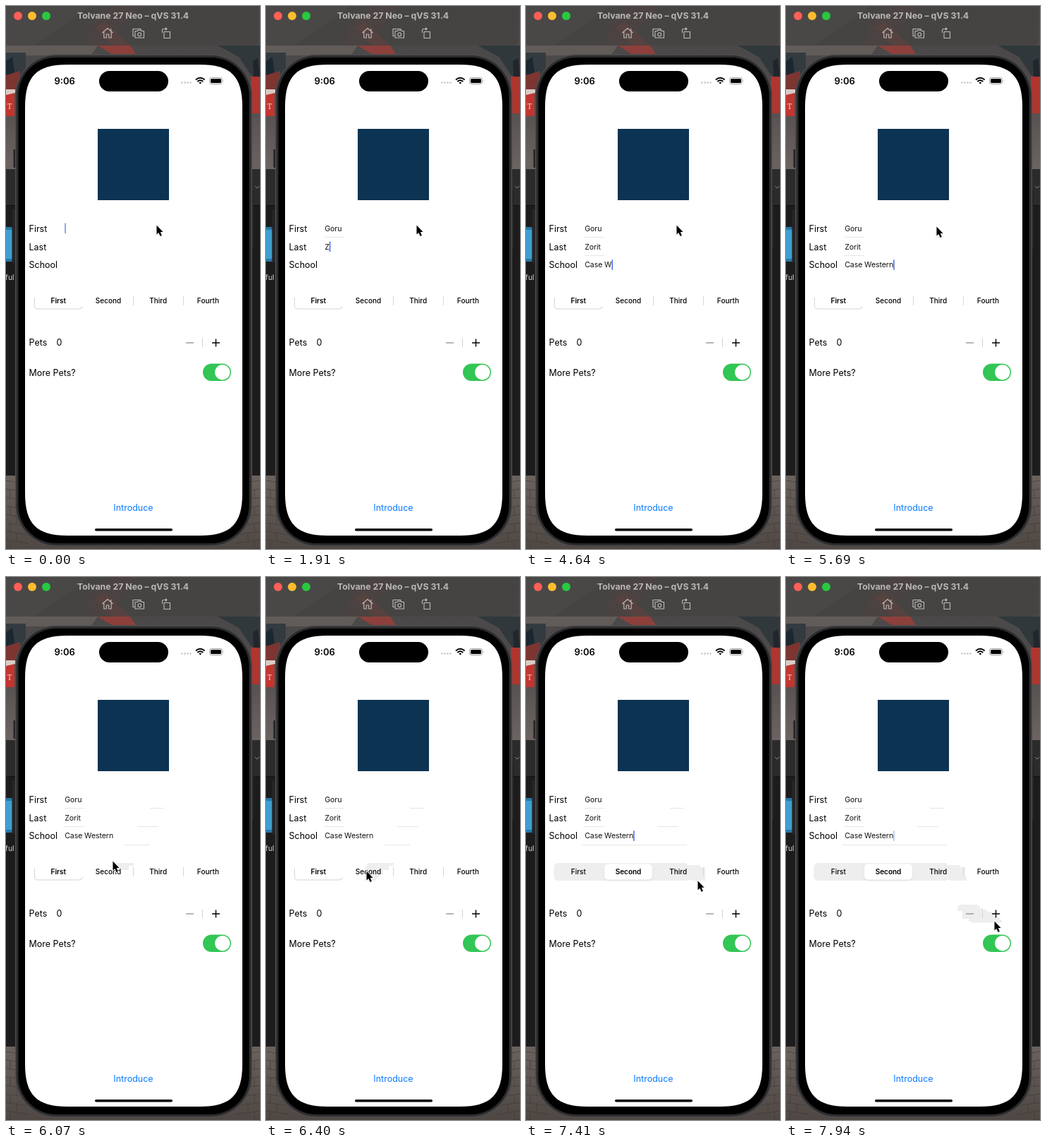
An HTML page for the animation above (8000 ms loop, 360 by 769 pixels).

```html
<!DOCTYPE html>
<html lang="en">
<head>
<meta charset="utf-8">
<title>Simulator form</title>
<style>
  html, body { margin: 0; width: 100%; height: 100%; overflow: hidden; background: #1c1b1b; }
  svg { display: block; width: 100%; height: 100%; }
  text { font-family: Inter, "Liberation Sans", sans-serif; white-space: pre; }
  .label { font-size: 12.5px; }
  .field { font-size: 10.6px; letter-spacing: -.1px; fill: #111; }
  .seg { font-size: 10px; font-weight: 500; text-anchor: middle; }
  .seg.on { font-weight: 600; }
  .icon { fill: none; stroke: #bdbcbb; stroke-width: 1.1; stroke-linejoin: round; }
</style>
</head>
<body>
<svg viewBox="0 0 360 769" preserveAspectRatio="none">
  <defs>
    <linearGradient id="street" x1="0" y1="0" x2="0" y2="1">
      <stop offset="0" stop-color="#4a4848"/><stop offset=".5" stop-color="#4d494a"/><stop offset="1" stop-color="#6c6461"/>
    </linearGradient>
    <linearGradient id="paving" x1="0" y1="0" x2="0" y2="1">
      <stop offset="0" stop-color="#6b625d"/><stop offset="1" stop-color="#4f4743"/>
    </linearGradient>
    <clipPath id="seen"><path id="seenPath"/></clipPath>
    <clipPath id="bar"><path d="M3 0H358V48Q358 56 350 56H11Q3 56 3 48Z"/></clipPath>
  </defs>

  <!-- desktop -->
  <rect width="360" height="232" fill="url(#street)"/>
  <path d="M0 56H130L120 70H0Z" fill="#625c59"/>
  <path d="M0 66H28V118H0Z" fill="#333b40"/>
  <path d="M0 78L9 72L12 92L5 108H0Z" fill="#1c2830"/>
  <path d="M0 98L20 92V116L0 120Z" fill="#7d3531"/>
  <path d="M0 124L12 120V156H0Z" fill="#c3352f"/>
  <path d="M0 118H13V123L0 126Z" fill="#d8ccc5"/>
  <text x="2" y="146" font-size="10" fill="#e8d9d4" style="font-family:'Noto Serif',serif">T</text>
  <path d="M130 56H176L184 68H150Z" fill="#8d403b"/>
  <path d="M300 56H360V100H349L330 72Z" fill="#30383c"/>
  <path d="M347 100L360 98V152H347Z" fill="#b0352f"/>
  <path d="M350 78L357 74L360 100H351Z" fill="#20262b"/>
  <rect y="231" width="360" height="434" fill="#1d1c1c"/>
  <rect y="231" width="360" height="51" fill="#2c2b2b"/>
  <path d="M0 282.5H360" stroke="#111"/>
  <path d="M353 255L356 258L359 255" fill="none" stroke="#888"/>
  <rect x="-5" y="313" width="16" height="49" rx="3" fill="#2678a6"/>
  <rect x="-5" y="317" width="14" height="41" rx="2" fill="#3f9fd0"/>
  <text x="-1" y="388" font-size="10.5" fill="#d0d0d0">ful</text>
  <rect y="665" width="360" height="104" fill="url(#paving)"/>
  <g id="stones" stroke="#3d3734" stroke-width="1" opacity=".6"></g>

  <!-- title bar -->
  <g clip-path="url(#bar)">
    <rect width="360" height="56" fill="#464443"/>
    <path d="M3 0H120L40 56H3Z" fill="#494847"/>
    <path d="M120 22L150 0H190L140 56H110Z" fill="#4a4341"/>
    <path d="M126 30L150 56H176L140 22Z" fill="#56423f"/>
  </g>
  <circle cx="17" cy="14" r="6" fill="#ff5f57"/>
  <circle cx="37" cy="14" r="6" fill="#febc2e"/>
  <circle cx="57" cy="14" r="6" fill="#28c840"/>
  <text x="180" y="18" text-anchor="middle" font-size="12.3" font-weight="700" fill="#b9b7b6">Tolvane 27 Neo – qVS 31.4</text>
  <g class="icon">
    <path d="M136.500 38L144 31.500L151.500 38M138.800 36.500V45H142.300V40H145.700V45H149.200V36.500M148.800 35V32"/>
    <path d="M182 42.500H180V32.500H191V34"/>
    <path d="M183 35.500H186L187.300 34.300H191.200L192.500 35.500H195.500V45H183Z"/>
    <circle cx="189.300" cy="40.200" r="2.400"/>
    <path d="M224 36.500H232.500V45.500H224ZM221.500 38V34.500Q221.500 32.500 223.500 32.500H228M226 30.500L228 32.500L226 34.500"/>
  </g>

  <!-- phone -->
  <g fill="#252526">
    <rect x="10.500" y="203" width="4" height="26" rx="1"/>
    <rect x="8.500" y="288" width="6" height="76" rx="1"/>
    <rect x="347" y="262" width="4" height="82" rx="1"/>
  </g>
  <rect x="13" y="68.500" width="336" height="697" rx="58" fill="#4d4c4e"/>
  <rect x="14.500" y="70" width="333" height="694" rx="57" fill="#2c2c2e"/>
  <rect x="17.500" y="73" width="327" height="688" rx="54" fill="#000"/>
  <path id="screen" fill="#fff"/>
  <rect x="132" y="92" width="98" height="29" rx="14.500" fill="#000"/>
  <rect x="126" y="740" width="110" height="3.600" rx="1.800" fill="#000"/>
  <text x="68.500" y="110.500" font-size="13" font-weight="600">9:06</text>
  <path d="M248.500 108.500H263" stroke="#b5b5b5" stroke-width="2" stroke-dasharray="2 2"/>
  <g fill="none" stroke="#000" stroke-width="2">
    <path d="M269 104.500Q275.300 99 281.600 104.500M271.300 107Q275.300 103.500 279.300 107"/>
    <path d="M273.300 108.500L275.300 110.600L277.300 108.500Q275.300 107 273.300 108.500Z" fill="#000" stroke="none"/>
  </g>
  <rect x="288.500" y="101.500" width="18" height="9" rx="2.800" fill="none" stroke="#999"/>
  <rect x="290" y="103" width="15" height="6" rx="1.500" fill="#000"/>
  <path d="M308 104.500Q309.500 106 308 107.500Z" fill="#999"/>
  <rect x="130" y="174" width="101" height="101" fill="#0d3353"/>

  <!-- form -->
  <path d="M40.500 413V424Q40.500 429 45 429H104Q108 429 108 425" fill="none" stroke="#cfcfd1" stroke-width=".9"/>
  <path d="M180.500 411V424M251.500 411V424" stroke="#d6d6d8"/>
  <g clip-path="url(#seen)">
    <rect x="30" y="300" width="300" height="220" fill="#fff"/>
    <path d="M80 327.500H320M80 353.500H320M80 379.500H320" stroke="#e6e6e8"/>
    <rect x="39.500" y="405" width="283" height="25" rx="6" fill="#eeeeef"/>
    <path id="divider" d="M180.500 411V424" stroke="#d6d6d8"/>
    <path d="M251.500 411V424" stroke="#d6d6d8"/>
    <g id="pill">
      <rect x="-.5" y="406.500" width="69" height="23.500" rx="6" fill="#dcdcde"/>
      <rect y="406.300" width="68" height="22.500" rx="5.500" fill="#fff"/>
    </g>
    <rect x="242" y="464" width="74" height="25.500" rx="6.500" fill="#eeeeef"/>
  </g>
  <g class="label">
    <text x="32.500" y="320">First</text>
    <text x="32.500" y="346">Last</text>
    <text x="32.500" y="371">School</text>
    <text x="32.500" y="480.500">Pets</text>
    <text x="71.500" y="481">0</text>
    <text x="32.500" y="523.500">More Pets?</text>
    <text x="180.500" y="714.500" text-anchor="middle" fill="#0a7aff">Introduce</text>
  </g>
  <g id="fields"></g>
  <rect id="caret" width="1.500" height="14.500" fill="#4468e8"/>
  <g id="segs"></g>
  <path d="M255 477H266" stroke="#858587" stroke-width="1.200"/>
  <path d="M278.500 470.500V483" stroke="#d2d2d4"/>
  <path d="M292 477H303M297.500 471.500V482.500" stroke="#000" stroke-width="1.400"/>
  <rect x="279" y="506.500" width="40" height="24.500" rx="12.250" fill="#32c655"/>
  <circle cx="306.800" cy="518.800" r="10.700" fill="#fff"/>

  <path id="pointer" d="M.5 .5V13.500L3.400 10.900L5.600 16L7.900 15L5.800 10H9.600Z" fill="#000" stroke="#fff" stroke-width="1.600" paint-order="stroke"/>
</svg>
<script>
const LOOP = 8000, STEP = 30;
const byId = id => document.getElementById(id);
const make = (parent, tag, attrs, text = '') => {
  const el = document.createElementNS('http://www.w3.org/2000/svg', tag);
  for (const k in attrs) el.setAttribute(k, attrs[k]);
  el.textContent = text;
  return parent.appendChild(el);
};

// rectangle with continuous corners: c is their reach, k the handle distance
function smoothRect(x, y, w, h, c, k) {
  const r = x + w, b = y + h;
  return `M${x} ${y + c}C${x} ${y + k} ${x + k} ${y} ${x + c} ${y}H${r - c}C${r - k} ${y} ${r} ${y + k} ${r} ${y + c}` +
    `V${b - c}C${r} ${b - k} ${r - k} ${b} ${r - c} ${b}H${x + c}C${x + k} ${b} ${x} ${b - k} ${x} ${b - c}Z`;
}
byId('screen').setAttribute('d', smoothRect(27, 83, 308, 667, 60, 16.5));

for (let y = 672; y < 769; y += 12)
  make(byId('stones'), 'path', { d: `M0 ${y}L32 ${y + 5}M${y % 24 ? 6 : 15} ${y + 1}v12M326 ${y + 5}L360 ${y}M${y % 24 ? 352 : 343} ${y + 2}v12` });

// each field: text, baseline, caret top, focus time, time of each keystroke
const fields = [
  { text: 'Goru', base: 318.5, top: 307.5, from: 0, keys: [320, 710, 790, 860] },
  { text: 'Zorit', base: 344.5, top: 333.5, from: 1400, keys: [1910, 2210, 2280, 2350, 2420] },
  { text: 'Case Western', base: 370, top: 359.3, from: 2840,
    keys: [3320, 3650, 3950, 4130, 4340, 4640, 4820, 5030, 5180, 5260, 5340, 5420] }
];
for (const f of fields) f.el = make(byId('fields'), 'text', { class: 'field', x: 83.2, y: f.base });

const segs = ['First', 'Second', 'Third', 'Fourth'].map((name, i) =>
  make(byId('segs'), 'text', { class: 'seg', x: 74.3 + i * 70.7, y: 421 }, name));

const caretFade = [[0, .8], [20, .55], [110, 0], [319, 0], [320, 1], [1399, 1], [1400, .25], [1520, 1],
  [5800, 1], [5950, 0], [7250, 0], [7350, 1], [7800, 1], [7940, .45], [8000, .45]];
const pointerPath = [[0, 213, 310], [5660, 213, 310], [5690, 213, 312], [5780, 209, 322], [5860, 200, 342],
  [5930, 188, 362], [6000, 167, 387], [6070, 151, 402], [6200, 143, 412], [6400, 142, 416], [7220, 142, 416],
  [7300, 190, 411], [7340, 216, 408], [7380, 243, 412], [7420, 243, 435], [7460, 252, 455], [7500, 264, 469],
  [7740, 264, 469], [7840, 283, 479], [7940, 295, 487], [8000, 295, 487]];
// areas repainted at set times: time, x, y, width, height
const repaints = [[1400, 83, 324, 28, 5], [2840, 83, 350, 28, 5], [6940, 39, 359, 142, 74], [7340, 153, 359, 75, 74]];

function track(table, t) {
  const i = table.findIndex(row => row[0] > t);
  if (i < 1) return table[table.length - 1].slice(1);
  const a = table[i - 1], b = table[i], k = (t - a[0]) / (b[0] - a[0]);
  return a.slice(1).map((v, j) => v + (b[j + 1] - v) * k);
}
const pointerAt = t => track(pointerPath, t);
const box = (x, y, w, h) => `M${x} ${y}h${w}v${h}h${-w}Z`;

// the form shows fully only where something has been repainted
function seenArea(t) {
  let d = 'M0 0';
  for (const [at, ...r] of repaints) if (t >= at) d += box(...r);
  for (let s = 5690; s <= t; s += STEP) {
    const [x0, y0] = pointerAt(s - STEP), [x1, y1] = pointerAt(s);
    if (x0 === x1 && y0 === y1) continue;
    const x = Math.min(x0, x1) - 2, y = Math.min(y0, y1);
    d += box(Math.round(x), Math.round(y), Math.round(Math.abs(x1 - x0) + 13), Math.round(Math.abs(y1 - y0) + 18));
  }
  return d;
}

function render(t) {
  let active;
  for (const f of fields) {
    f.el.textContent = f.text.slice(0, f.keys.filter(k => k <= t).length);
    if (t >= f.from) active = f;
  }
  const caret = byId('caret');
  const width = active.el.textContent ? active.el.getComputedTextLength() : 0;
  caret.setAttribute('x', 83.3 + width);
  caret.setAttribute('y', active.top);
  caret.setAttribute('opacity', track(caretFade, t)[0]);

  const k = Math.min(1, Math.max(0, (t - 6940) / 310));
  byId('pill').setAttribute('transform', `translate(${41 + 70 * k * k * (3 - 2 * k)} 0)`);
  byId('divider').setAttribute('opacity', 1 - k);
  segs[0].classList.toggle('on', t < 6940);
  segs[1].classList.toggle('on', t >= 7220);

  byId('seenPath').setAttribute('d', seenArea(t));
  byId('pointer').setAttribute('transform', `translate(${pointerAt(t).join(' ')})`);
}

const start = performance.now();
function tick() {
  render((performance.now() - start) % LOOP);
  requestAnimationFrame(tick);
}
tick();
</script>
</body>
</html>
```
